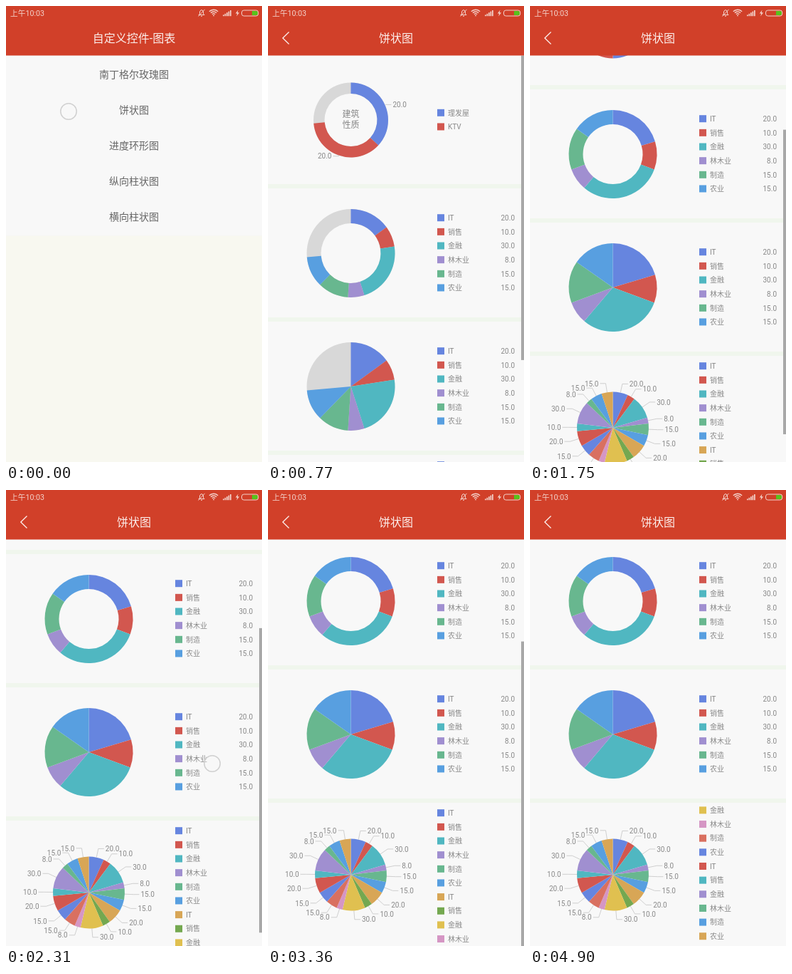
An HTML page with a canvas that plays this animation: 360x640 px, repeating every 4970 ms.

```html
<!DOCTYPE html>
<html lang="zh-CN">
<head>
<meta charset="utf-8">
<title>图表</title>
<style>
html, body { margin: 0; width: 100%; height: 100%; overflow: hidden; background: #f8f8f0; }
canvas { display: block; }
</style>
</head>
<body>
<canvas id="stage" width="360" height="640"></canvas>
<script>
const ctx = document.getElementById('stage').getContext('2d');
const W = 360, H = 640, LOOP = 4970, STEP = 70;
const TOP = 69.5, MAX_SCROLL = 191, CX = 116.5, ROW = 19.65;
const RED = '#d14029', PAGE = '#f8f8f8', TEXT = '#888888';
const COLORS = ['#6685df', '#d2574f', '#50b7c1', '#a08fd0', '#68b78f', '#589fe0',
  '#d8a656', '#74a850', '#e0c050', '#d596c4', '#d97060'];
const SECTORS = ['IT', '销售', '金融', '林木业', '制造', '农业'];
const VALUES = [20, 10, 30, 8, 15, 15];
const thrice = list => [...list, ...list, ...list];

const CHARTS = [
  { y: 160, r: 52.5, hole: 37, names: ['理发屋', 'KTV'], values: [20, 20], legendY: 149.8, reach: 53.5 },
  { y: 347, r: 62, hole: 42, names: SECTORS, values: VALUES, legendY: 297.2, amounts: true },
  { y: 534, r: 62, hole: 0, names: SECTORS, values: VALUES, legendY: 484.2, amounts: true },
  { y: 731, r: 50.5, hole: 0, names: thrice(SECTORS), values: thrice(VALUES), legendY: 644.2, reach: 63, scrolls: true }
];

// Finger contacts as [time, x, y] at both ends
const TOUCHES = [
  [[0, 88, 148], [69, 88, 148]],
  [[1120, 261, 484], [1540, 272, 352]],
  [[2170, 287, 405], [2450, 293, 363]],
  [[4060, 292, 569], [4410, 299, 443]]
];
const PAGE_SCROLL = [[1190, 0], [1400, 71], [1540, 112], [1750, 139], [1960, 145], [2170, 145],
  [2310, 166], [2450, 187], [2520, MAX_SCROLL]];
const LEGEND_SCROLL = [[4060, 0], [4340, 93.7], [4410, 118], [4480, 138], [4550, 151], [4620, 158], [4690, 161]];

const clamp = v => Math.max(0, Math.min(1, v));
const span = (t, start, end) => clamp((t - start) / (end - start));
const mix = (a, b, p) => a + (b - a) * p;

function track(keys, t) {
  if (t <= keys[0][0]) return keys[0][1];
  for (let i = 1; i < keys.length; i++) {
    const [t0, v0] = keys[i - 1], [t1, v1] = keys[i];
    if (t < t1) return mix(v0, v1, span(t, t0, t1));
  }
  return keys[keys.length - 1][1];
}

function rect(x, y, w, h, color) {
  ctx.fillStyle = color;
  ctx.fillRect(x, y, w, h);
}

function label(str, x, y, size, color, align = 'left') {
  ctx.font = `${size}px Roboto, "Noto Sans CJK SC", "Noto Sans CJK", sans-serif`;
  ctx.textAlign = align;
  ctx.fillStyle = color;
  ctx.fillText(str, x, y + size * 0.37);
}

function line(points, color, width) {
  ctx.strokeStyle = color;
  ctx.lineWidth = width;
  ctx.beginPath();
  points.forEach(([x, y]) => ctx.lineTo(x, y));
  ctx.stroke();
}

function slice(y, r, hole, from, to, color) {
  const a = from - Math.PI / 2, b = to - Math.PI / 2;
  ctx.fillStyle = color;
  ctx.beginPath();
  ctx.arc(CX, y, r, a, b);
  ctx.arc(CX, y, hole, b, a, true);
  ctx.fill();
}

function drawPie(chart, progress) {
  const { y, r, hole, values, reach } = chart;
  const total = values.reduce((a, b) => a + b);
  const turn = Math.PI * 2 * progress;
  if (progress < 1) slice(y, r, hole, 0, Math.PI * 2, '#d8d8d8');
  let sum = 0;
  values.forEach((value, i) => {
    const from = sum / total * turn;
    sum += value;
    const to = sum / total * turn;
    slice(y, r, hole, from, to, COLORS[i % COLORS.length]);
    if (!reach) return;
    const mid = (from + to) / 2, dx = Math.sin(mid), dy = -Math.cos(mid);
    const side = mid < Math.PI - 1e-6 ? 1 : -1;
    const x = CX + dx * reach, ly = y + dy * reach;
    line([[CX + dx * r, y + dy * r], [x, ly], [x + side * 8, ly]], '#c4c4c4', 0.8);
    label(value.toFixed(1), x + side * 10, ly, 10, TEXT, side > 0 ? 'left' : 'right');
  });
}

function drawLegend(chart, offset) {
  ctx.save();
  if (chart.scrolls) {
    ctx.beginPath();
    ctx.rect(230, 630, 130, 201);
    ctx.clip();
  }
  chart.names.forEach((name, i) => {
    const y = chart.legendY + i * ROW - (chart.scrolls ? offset : 0);
    rect(238, y - 5, 10, 10, COLORS[i % COLORS.length]);
    label(name, 253, y, 10, TEXT);
    if (chart.amounts) label(chart.values[i].toFixed(1), 347, y, 10, TEXT, 'right');
  });
  ctx.restore();
}

function drawHeader(title) {
  rect(0, 0, W, TOP, RED);
  label(title, W / 2, 45.5, 16, '#fcefec', 'center');
}

function drawMenu() {
  rect(0, 0, W, H, '#f8f8f0');
  rect(0, 0, W, 322.5, PAGE);
  ['南丁格尔玫瑰图', '饼状图', '进度环形图', '纵向柱状图', '横向柱状图']
    .forEach((item, i) => label(item, W / 2, 96 + i * 50, 14, '#666666', 'center'));
  drawHeader('自定义控件-图表');
}

function drawCharts(t) {
  const scroll = track(PAGE_SCROLL, t);
  const progress = (1 - Math.cos(Math.PI * span(t, 245, 1045))) / 2;
  rect(0, 0, W, H, PAGE);
  ctx.save();
  ctx.translate(0, -scroll);
  [250, 437, 624].forEach(y => rect(0, y, W, 6, '#f0f6ed'));
  CHARTS.forEach(chart => {
    drawPie(chart, progress);
    drawLegend(chart, track(LEGEND_SCROLL, t));
  });
  label('建筑', CX, 152, 12, TEXT, 'center');
  label('性质', CX, 167, 12, TEXT, 'center');
  ctx.restore();

  const view = H - TOP, ratio = view / (view + MAX_SCROLL);
  ctx.globalAlpha = 1 - span(t, 3430, 3680);
  rect(356, TOP + scroll * ratio, 4, view * ratio, '#a8a8a8');
  ctx.globalAlpha = 1;
  drawHeader('饼状图');
  line([[29.5, 36.5], [20.8, 45], [29.5, 53.5]], '#fcefec', 1.3);
}

function drawStatus() {
  const ink = '#f3d3cc';
  label('上午10:03', 6, 10, 10.7, ink);

  // Muted bell
  line([[271, 12.5], [272.5, 11], [272.5, 8], [274, 5.8], [276, 5.8], [277.5, 8],
    [277.5, 11], [279, 12.5], [271, 12.5]], ink, 1);
  line([[274, 14.3], [276, 14.3]], ink, 1);
  line([[270.5, 14.5], [279.5, 4.8]], ink, 1);

  // Wi-Fi
  ctx.lineWidth = 1.4;
  ctx.strokeStyle = ink;
  [8.4, 5.6, 2.8].forEach(r => {
    ctx.beginPath();
    ctx.arc(292, 13.6, r, -Math.PI * 0.76, -Math.PI * 0.24);
    ctx.stroke();
  });
  rect(291.2, 12.6, 1.6, 1.6, ink);

  for (let i = 0; i < 5; i++) rect(305 + i * 2.5, 12.4 - i * 1.6, 1.7, 1.8 + i * 1.6, ink);

  // Charging bolt and battery
  ctx.fillStyle = ink;
  ctx.beginPath();
  [[326.5, 5.5], [322.8, 10.6], [325.2, 10.6], [324.2, 14.5], [328, 9.2], [325.6, 9.2]]
    .forEach(([x, y]) => ctx.lineTo(x, y));
  ctx.fill();
  ctx.fillStyle = '#58c21c';
  ctx.beginPath();
  ctx.roundRect(346, 7, 8, 6, [0, 2, 2, 0]);
  ctx.fill();
  ctx.lineWidth = 1;
  ctx.beginPath();
  ctx.roundRect(331.5, 6, 23.2, 8, 3);
  ctx.stroke();
}

function drawTouch(t) {
  TOUCHES.forEach(([[t0, x0, y0], [t1, x1, y1]]) => {
    if (t < t0 || t > t1) return;
    const p = span(t, t0, t1);
    ctx.beginPath();
    ctx.arc(mix(x0, x1, p), mix(y0, y1, p), 11.2, 0, Math.PI * 2);
    ctx.fillStyle = 'rgba(248,248,248,0.3)';
    ctx.fill();
    ctx.strokeStyle = '#d0d0d0';
    ctx.lineWidth = 1.5;
    ctx.stroke();
  });
}

function frame(now) {
  const t = Math.floor((now % LOOP) / STEP) * STEP;
  const slide = 1 - Math.pow(1 - span(t, 140, 490), 3);
  if (slide < 1) {
    ctx.save();
    ctx.translate(-W * 0.25 * slide, 0);
    drawMenu();
    ctx.restore();
  }
  if (slide > 0) {
    ctx.save();
    ctx.translate(W * (1 - slide), 0);
    drawCharts(t);
    ctx.restore();
  }
  drawStatus();
  drawTouch(t);
}

const start = performance.now();
function loop() {
  frame(performance.now() - start);
  requestAnimationFrame(loop);
}
loop();
</script>
</body>
</html>
```
